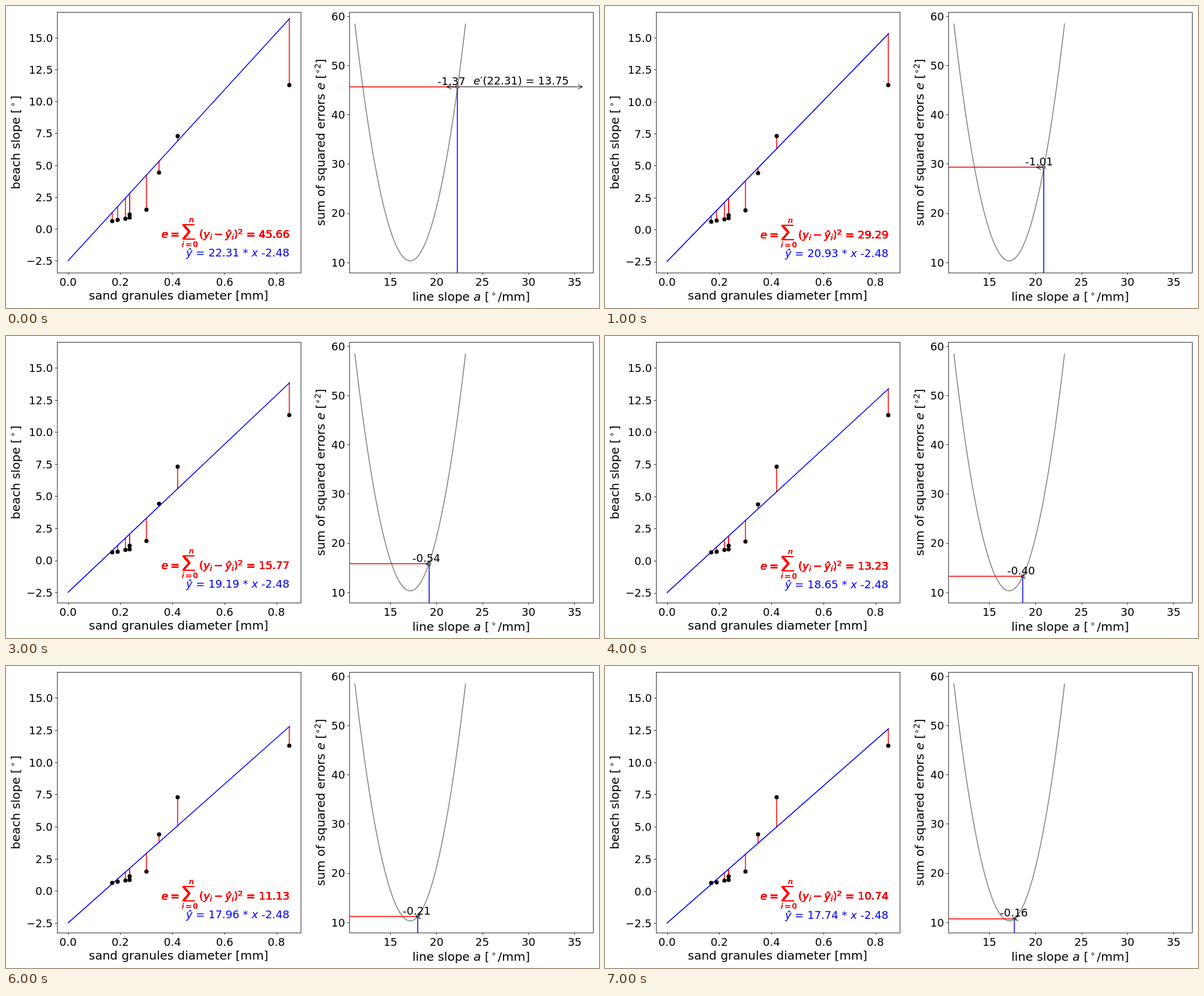
Write an HTML page with a canvas that moves like this. It is 988 px wide and 504 px high and loops after 8 s.

```html
<!DOCTYPE html>
<html lang="en">
<head>
<meta charset="utf-8">
<title>Gradient descent on a line slope</title>
<style>
html, body { margin: 0; width: 100%; height: 100%; overflow: hidden; background: #fff; }
canvas { display: block; }
</style>
</head>
<body>
<canvas id="stage" width="988" height="504"></canvas>
<script>
const ctx = document.getElementById('stage').getContext('2d');
const STEP_MS = 1000, STEPS = 8, RATE = 0.1;
const TOP = 10.2, BOTTOM = 445.08, AX_W = 405.82;
const LEFT_X = 85.1, RIGHT_X = 572.08;

const diameters = [0.17, 0.19, 0.22, 0.235, 0.235, 0.3, 0.35, 0.42, 0.85];
const slopes = [0.63, 0.7, 0.82, 0.88, 1.15, 1.5, 4.4, 7.3, 11.3];

// Least squares fit
const sum = f => diameters.reduce((s, x, i) => s + f(x, slopes[i]), 0);
const n = diameters.length;
const meanX = sum(x => x) / n, meanY = sum((x, y) => y) / n;
const bestA = sum((x, y) => (x - meanX) * (y - meanY)) / sum(x => (x - meanX) ** 2);
const b = meanY - bestA * meanX;
const error = a => sum((x, y) => (y - a * x - b) ** 2);
const gradient = a => 2 * sum((x, y) => x * (a * x + b - y));

const scale = (d0, d1, p0, p1) => v => p0 + (v - d0) / (d1 - d0) * (p1 - p0);
const snap = v => Math.round(v);

function stroke(points, color, width, cap = 'square') {
  ctx.strokeStyle = color;
  ctx.lineWidth = width;
  ctx.lineCap = cap;
  ctx.lineJoin = 'round';
  ctx.beginPath();
  points.forEach(([x, y]) => ctx.lineTo(x, y));
  ctx.stroke();
}

function dot(x, y, color) {
  ctx.fillStyle = color;
  ctx.beginPath();
  ctx.arc(snap(x), snap(y), 3.5, 0, 2 * Math.PI);
  ctx.fill();
}

// Text made of parts: a string, or { t, it, size, up, pad }
function text(parts, x, y, { size = 18, align = 0, color = '#000', turn = 0 } = {}) {
  const setFont = p => {
    ctx.font = `${p.it ? 'italic ' : ''}${p.size || size}px "DejaVu Sans", sans-serif`;
  };
  const items = [].concat(parts).map(p => {
    const item = typeof p === 'string' ? { t: p } : p;
    setFont(item);
    return { pad: 0, up: 0, ...item, w: ctx.measureText(item.t).width };
  });
  const total = items.reduce((s, p) => s + p.w + 2 * p.pad, 0);
  const shift = align * total;
  ctx.save();
  ctx.translate(snap(x - shift * Math.cos(turn)), snap(y - shift * Math.sin(turn)));
  ctx.rotate(turn);
  ctx.fillStyle = color;
  let pos = 0;
  for (const p of items) {
    setFont(p);
    ctx.fillText(p.t, pos + p.pad, -p.up);
    pos += p.w + 2 * p.pad;
  }
  ctx.restore();
}

const it = t => ({ t, it: true });
const sup = (t, pad = 0) => ({ t, size: 14, up: 7.5, pad });

function frame(x0) {
  const l = snap(x0) + 0.5, r = snap(x0 + AX_W) + 0.5;
  const t = snap(TOP) + 0.5, bot = snap(BOTTOM) + 0.5;
  ctx.strokeStyle = '#000';
  ctx.lineWidth = 0.8;
  ctx.lineJoin = 'miter';
  ctx.strokeRect(l, t, r - l, bot - t);
}

function xTicks(values, X, digits) {
  for (const v of values) {
    const x = snap(X(v)) + 0.5;
    stroke([[x, BOTTOM], [x, BOTTOM + 3.5]], '#000', 0.8, 'butt');
    text(v.toFixed(digits), X(v), 467, { align: 0.5 });
  }
}

function yTicks(values, Y, x0, digits) {
  for (const v of values) {
    const y = snap(Y(v)) + 0.5;
    stroke([[x0 - 3.5, y], [x0, y]], '#000', 0.8, 'butt');
    text(v.toFixed(digits).replace('-', '\u2212'), x0 - 7, Y(v) + 6.9, { align: 1 });
  }
}

function arrow(x, tip, y) {
  const dir = Math.sign(tip - x), len = Math.abs(tip - x);
  const start = x + dir * 2;
  const end = len > 4 ? tip - dir * 2 : tip;
  const head = end - dir * 1.1;
  stroke([[start, y], [head, y]], '#000', 1, 'round');
  stroke([[head - dir * 7.2, y - 3.6], [head, y], [head - dir * 7.2, y + 3.6]], '#000', 1, 'round');
}

function errorFormula(value, right, y) {
  const red = { color: '#f00' };
  const small = { size: 12.6, color: '#f00' };
  text(it('e'), right - 213.3, y, red);
  text('=', right - 198.5, y, red);
  text(it('n'), right - 163, y - 26, { ...small, align: 0.5 });
  text([it('i'), { t: '=', pad: 2.4 }, '0'], right - 166, y + 15, { ...small, align: 0.5 });
  const sub = { t: 'i', it: true, size: 12.6, up: -3 };
  text(['(', it('y'), sub, { t: '\u2212', pad: 3.5 }, it('\u0177'), sub, ')',
    { t: '2', size: 12.6, up: 6.5 }, ' = ' + value.toFixed(2)], right, y, { ...red, align: 1 });

  const sigma = [[0, -23], [20, -23], [20, -21], [4.5, -21], [13.5, -10.5], [4, 1],
    [21, 1], [21, 3], [0, 3], [0, 1], [9.5, -10.3], [0, -21]];
  ctx.fillStyle = '#f00';
  ctx.beginPath();
  sigma.forEach(([dx, dy]) => ctx.lineTo(snap(right - 178) + dx, y + dy));
  ctx.fill();
}

function drawFit(a) {
  const end = a * 0.85 + b;
  const X = scale(-0.0425, 0.8925, LEFT_X, LEFT_X + AX_W);
  const Y = scale(b - 0.05 * (end - b), 17, BOTTOM, TOP);
  frame(LEFT_X);
  xTicks([0, 0.2, 0.4, 0.6, 0.8], X, 1);
  yTicks([-2.5, 0, 2.5, 5, 7.5, 10, 12.5, 15], Y, LEFT_X, 1);
  text('sand granules diameter [mm]', LEFT_X + AX_W / 2, 490, { size: 20, align: 0.5 });
  text(['beach slope [', sup('\u2218', 2.7), ']'], 23, (TOP + BOTTOM) / 2,
    { size: 20, align: 0.5, turn: -Math.PI / 2 });

  diameters.forEach((x, i) => {
    const px = snap(X(x));
    stroke([[px, snap(Y(slopes[i]))], [px, snap(Y(a * x + b))]], '#f00', 1.5);
  });
  stroke([[X(0), Y(b)], [X(0.85), Y(end)]], '#00f', 1.5);
  diameters.forEach((x, i) => dot(X(x), Y(slopes[i]), '#000'));

  // The formula is overprinted once per sample, which thickens it
  diameters.forEach(() => errorFormula(error(a), X(0.85), snap(Y(-0.68))));
  text([it('\u0177'), ` = ${a.toFixed(2)} * `, it('x'), ' ' + b.toFixed(2)],
    X(0.85), Y(-2.14), { align: 1, color: '#00f' });
}

function drawError(a, first) {
  const a0 = 0.65 * bestA, a1 = 1.35 * bestA;
  const low = error(bestA), high = error(a1), margin = 0.05 * (high - low);
  const X = scale(a0 - 0.05 * (a1 - a0), 37, RIGHT_X, RIGHT_X + AX_W);
  const Y = scale(low - margin, high + margin, BOTTOM, TOP);
  frame(RIGHT_X);
  xTicks([15, 20, 25, 30, 35], X, 0);
  yTicks([10, 20, 30, 40, 50, 60], Y, RIGHT_X, 0);
  text(['line slope ', it('a'), ' [', sup('\u2218', 2.7), '/mm]'],
    RIGHT_X + AX_W / 2, 492, { size: 20, align: 0.5 });
  text(['sum of squared errors ', it('e'), ' [', sup('\u22182'), ']'], 531, (TOP + BOTTOM) / 2,
    { size: 20, align: 0.5, turn: -Math.PI / 2 });

  const curve = Array.from({ length: 101 }, (_, i) => {
    const v = a0 + (a1 - a0) * i / 100;
    return [X(v), Y(error(v))];
  });
  stroke(curve, '#808080', 1.5);

  const x = X(a), y = Y(error(a)), g = gradient(a), move = -RATE * g;
  stroke([[snap(x), snap(y)], [snap(x), BOTTOM]], '#00f', 1.5, 'butt');
  stroke([[RIGHT_X + 0.6, snap(y)], [x, snap(y)]], '#f00', 1.5, 'butt');
  dot(x, y, '#808080');

  const base = snap(y - 3.1);
  arrow(x, X(a + move), y);
  text(move.toFixed(2), X(a + move / 2), base, { align: 0.5 });
  if (first) {
    arrow(x, X(a + g), y);
    text([it('e'), '\u2032', `(${a.toFixed(2)}) = ${g.toFixed(2)}`],
      X(a + g / 2), base - 1, { align: 0.5 });
  }
}

function draw(now) {
  const step = Math.floor(now / STEP_MS) % STEPS;
  let a = 1.3 * bestA;
  for (let i = 0; i < step; i++) a -= RATE * gradient(a);
  ctx.fillStyle = '#fff';
  ctx.fillRect(0, 0, 988, 504);
  drawFit(a);
  drawError(a, step === 0);
}

let start = null;
function tick(now) {
  if (start === null) start = now;
  draw(Math.max(0, now - start));
  requestAnimationFrame(tick);
}
draw(0);
requestAnimationFrame(tick);
</script>
</body>
</html>
```
